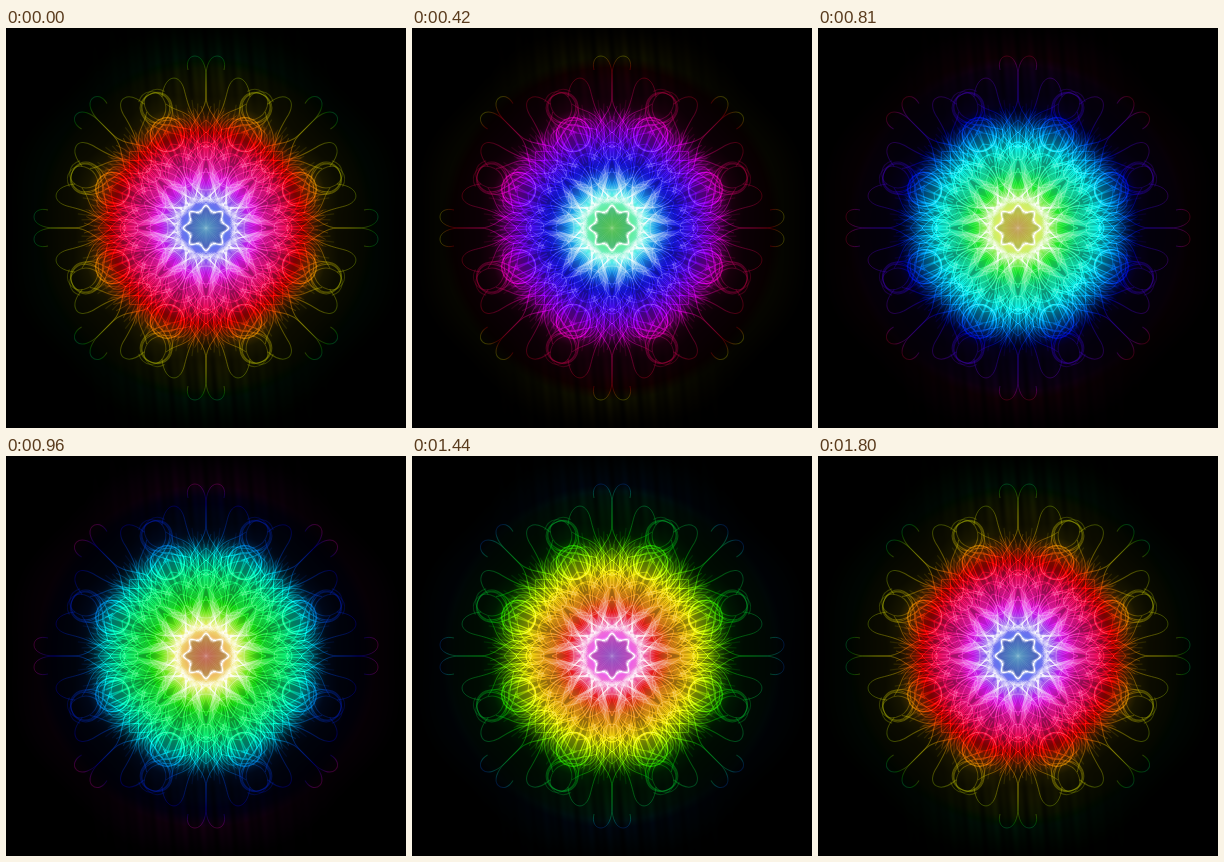
These frames come from a looping animation (400 px wide and 400 px high, 1830 ms). An HTML page with a canvas:

```html
<!DOCTYPE html>
<html lang="en">
<head>
<meta charset="utf-8">
<title>Mandala</title>
<style>
html, body { margin: 0; width: 100%; height: 100%; overflow: hidden; background: #000; }
canvas { display: block; width: 400px; height: 400px; }
</style>
</head>
<body>
<canvas id="stage" width="400" height="400"></canvas>
<script>
const SIZE = 400, MID = 200, STEP = 30, STEPS = 61;

// Radial profiles as [radius, value] stops.
const HUE = [[0, 200], [25, 238], [42, 285], [60, 320], [80, 340], [100, 366], [115, 393], [125, 413], [145, 423], [160, 442], [172, 505], [200, 485], [290, 480]];
const BASE = [[0, .55], [22, .86], [32, .76], [45, .57], [60, .43], [80, .36], [98, .28], [110, .16], [122, .06], [135, .03], [160, .018], [180, .01], [200, 0], [290, 0]];
const GAIN = [[0, .2], [22, .3], [38, .4], [60, .5], [100, .5], [114, .44], [128, .34], [150, .28], [175, .22], [290, .2]];

function along(stops, r) {
  const i = Math.max(1, stops.findIndex(s => s[0] >= r));
  const [r0, v0] = stops[i - 1], [r1, v1] = stops[i];
  return v0 + (v1 - v0) * Math.min(1, (r - r0) / (r1 - r0));
}

function layer() {
  const c = document.createElement('canvas');
  c.width = c.height = SIZE;
  return c.getContext('2d', { willReadFrequently: true });
}

const ink = layer();

// Repeats a path eightfold with its mirror image; y points outward.
function petal(path, alpha, width = 1, mirror = true, half = 0) {
  const p = path instanceof Path2D ? path : new Path2D(path);
  ink.strokeStyle = `rgba(255,255,255,${alpha})`;
  ink.lineWidth = width;
  for (let k = 0; k < 8; k++) {
    for (const side of mirror ? [1, -1] : [1]) {
      ink.setTransform(1, 0, 0, 1, MID, MID);
      ink.rotate((k + half) * Math.PI / 4);
      ink.scale(side, -1);
      ink.stroke(p);
    }
  }
}

function ring(y, radius, alpha, half = 0, width = 1) {
  const p = new Path2D();
  p.arc(0, y, radius, 0, 7);
  petal(p, alpha, width, false, half);
}

function drawInk() {
  // Hooks and curls of the outer lace
  petal('M18 158C20 166 17 172 11 172C4 172 0 162 0 152L0 132C0 120 8 112 14 102C19 93 10 86 0 80', .45);
  petal('M44 131C42 153 27 156 22 139C18 124 16 112 0 95', .45);
  petal('M40 124C30 116 18 118 10 104C4 92 10 80 18 68', .4);
  petal('M24 96C10 108 -12 114 -14 130C-14 150 16 150 16 130C15 116 6 110 -4 102', .4, 1, true, .5);
  petal('M-14 142C-6 152 8 148 10 136C12 122 0 114 -14 112C-26 110 -26 96 -18 84', .35, 1, true, .5);
  ring(130, 15, .35, .5);
  ring(101, 17, .55, .5, 1.2);
  ring(98, 13, .3, .5);

  // Woven petals
  for (let k = 0; k < 5; k++) {
    const w = 34 - 5 * k, top = 108 - 12 * k;
    petal(`M${k * 2 - 8} 26C${w} 46 ${w - 4} ${top - 24} 0 ${top}`, .34);
    petal(`M${k * 2 - 6} 28C${w - 6} 50 ${w} ${top - 20} 0 ${top - 5}`, .28, 1, true, .5);
  }
  // Silky strands
  for (let k = 0; k < 6; k++) {
    const u = k / 5;
    petal(`M${8 * u} 24C${20 + 12 * u} 42 ${-14 - 12 * u} 72 ${5 + 32 * u} ${122 - 12 * u}`, .26);
    petal(`M${9 - 7 * u} 25C${-18 + 30 * u} 46 ${30 - 12 * u} 66 ${14 + 20 * u} ${92 + 8 * u}`, .22);
  }
  ring(77, 9, .4);
  ring(60, 22, .35);
  ring(62, 17, .35, .5);
  ring(42, 14, .3);
  ring(37, 10, .3, .5);

  // Tapered rays
  for (let k = 0; k < 9; k++) {
    const a = (k + .5) / 9 * Math.PI / 8, reach = 112 + 17 * Math.abs(Math.sin(k * 2.3));
    const s = Math.sin(a), c = Math.cos(a), bend = 4 * Math.sin(k * 1.7);
    for (const cut of [0, 10])
      petal(`M${s * 70} ${c * 70}Q${s * 90 + bend} ${c * 90} ${s * (reach - cut)} ${c * (reach - cut)}`, .14, 1.2);
  }
  // Spokes of the heart
  for (let k = 0; k < 4; k++)
    petal(`M0 0Q${k * 2 - 2} 10 ${k * 2} 19`, .25, .7);
}
drawInk();

const glow = layer();
glow.filter = 'blur(3px)';
glow.drawImage(ink.canvas, 0, 0);

const light = new Float32Array(SIZE * SIZE);
const chroma = new Float32Array(SIZE * SIZE);
const radius = new Uint16Array(SIZE * SIZE);

// Faint slanting curtains above and below
function curtain(x, y) {
  const lean = x - y * .08;
  const folds = .5 + .3 * Math.sin(lean * .3) + .2 * Math.sin(lean * .71 + 1);
  return .035 * folds * Math.exp(-((x / 65) ** 2) - ((Math.abs(y) - 155) / 35) ** 2);
}

function bakeLight() {
  const lines = ink.getImageData(0, 0, SIZE, SIZE).data;
  const soft = glow.getImageData(0, 0, SIZE, SIZE).data;
  for (let i = 0; i < light.length; i++) {
    const x = i % SIZE + .5 - MID, y = Math.floor(i / SIZE) + .5 - MID;
    const r = Math.hypot(x, y), a = Math.atan2(y, x);
    const edge = r - (17 + 5 * Math.abs(Math.cos(4 * a)) ** 3);
    const line = lines[i * 4 + 3] / 255, haze = soft[i * 4 + 3] / 255;
    let v;
    if (edge < 0) {
      v = .5 + .18 * line;
    } else {
      const lobe = r > 80 ? 4 * Math.cos(8 * a) : 0;
      v = along(BASE, Math.max(r + lobe, 23)) * (.75 + .35 * haze) + along(GAIN, r) * line;
    }
    v += .35 * Math.exp(-edge * edge / 3) + curtain(x, y);
    light[i] = Math.min(1, v);
    chroma[i] = edge < 0 ? .46 : Math.min(1, .8 + Math.max(0, r - 60) / 200);
    radius[i] = Math.round(r * 2);
  }
}
bakeLight();

const HUES = Array.from({ length: 570 }, (_, i) => along(HUE, i / 2));
const stage = document.getElementById('stage').getContext('2d');
const image = stage.createImageData(SIZE, SIZE);
const tint = new Float32Array(HUES.length * 3);

function paint(step) {
  HUES.forEach((h, i) => {
    for (let c = 0; c < 3; c++) {
      const k = (((h - step * 6) / 60 - c * 2) % 6 + 6) % 6;
      tint[i * 3 + c] = Math.min(1, Math.max(0, Math.abs(k - 3) - 1));
    }
  });
  const out = image.data;
  for (let i = 0; i < light.length; i++) {
    const v = light[i], span = (1 - Math.abs(2 * v - 1)) * chroma[i];
    for (let c = 0; c < 3; c++)
      out[i * 4 + c] = 255 * (v + span * (tint[radius[i] * 3 + c] - .5));
    out[i * 4 + 3] = 255;
  }
  stage.putImageData(image, 0, 0);
}

let shown = -1;
const start = performance.now();
function tick() {
  const step = Math.floor((performance.now() - start) / STEP) % STEPS;
  if (step !== shown) paint(shown = step);
  requestAnimationFrame(tick);
}
tick();
</script>
</body>
</html>
```
